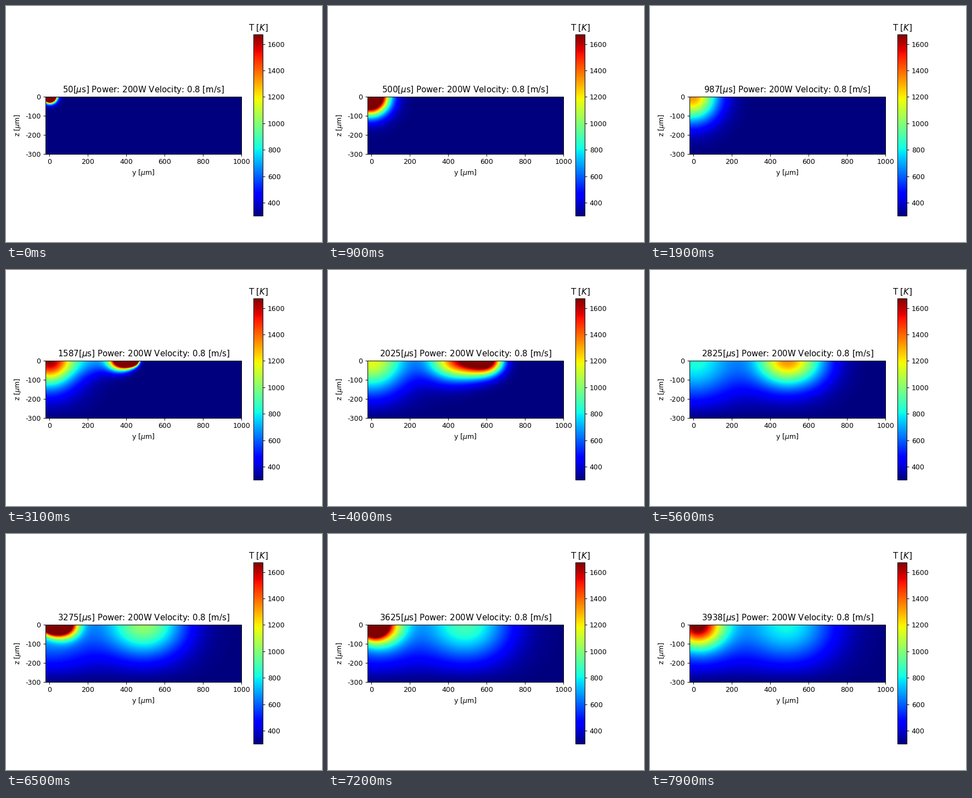
A matplotlib script that plays this animation: 576x432 px, repeating every 8000 ms.

```python
import numpy as np
import matplotlib.pyplot as plt
from matplotlib.animation import FuncAnimation

plt.rcParams["font.family"] = "DejaVu Sans"
plt.rcParams["axes.unicode_minus"] = False

FRAMES, INTERVAL = 80, 100
T_COLD, T_MELT = 300, 1673
DIFFUSION = 5      # um^2 per us
SPOT = 200         # squared beam radius, um^2
RATE = 80000       # heat put in per us at full power
LOSS = 0.1         # extra decay of old heat
DEPTH = 300        # the bottom is kept cold
PULSE = 5          # us between heat pulses

# Laser legs near the section: start, end, y from, y to, power from, power to
LEGS = [
    (0, 265, 5, -15, 1, 1),
    (987, 1097, -5, -5, 1, 1),
    (1097, 1450, 0, 338, 0.15, 0.15),
    (1450, 1830, 338, 642, 0.75, 1),
    (2150, 2300, 540, 420, 0.45, 0.45),
    (3060, 3210, 110, -10, 1, 1),
    (3400, 3480, 10, 10, 1, 1),
]

STEP = 10
y = np.arange(-20, 1001, STEP)
z = np.arange(-DEPTH, 1, STEP)


def pulses():
    """Split the legs into rows of time, place and heat."""
    rows = []
    for t0, t1, y0, y1, p0, p1 in LEGS:
        n = round((t1 - t0) / PULSE)
        u = (np.arange(n) + 0.5) / n
        rows.append([t0 + (t1 - t0) * u, y0 + (y1 - y0) * u,
                     RATE * (t1 - t0) / n * (p0 + (p1 - p0) * u)])
    return np.hstack(rows)


WHEN, WHERE, HEAT = pulses()


def field(t):
    """Temperature from all pulses so far, each spreading by diffusion."""
    past = WHEN < t
    w = SPOT + 4 * DIFFUSION * (t - WHEN[past])[:, None]
    along = np.exp(-(y - WHERE[past][:, None]) ** 2 / w)
    # a negative mirror pulse below holds the bottom cold
    down = np.exp(-z ** 2 / w) - np.exp(-(z + 2 * DEPTH) ** 2 / w)
    peak = HEAT[past][:, None] / w * (3000 / w) ** LOSS
    return T_COLD + (peak * down).T @ along


def clock(i):
    """Simulated time; a step is cut short where a scan line ends."""
    t = 50 * (i + 1)
    for first, cut in ((18, 12.5), (37, 12.5), (75, 25), (79, 12.5)):
        t -= cut * (i >= first)
    return t


def caption(t):
    shown = t - 1e-6 if t < 1900 else t
    return rf"{shown:.0f}[$\mu$s] Power: 200W Velocity: 0.8 [m/s]"


fig, ax = plt.subplots(figsize=(6.4, 4.8), dpi=90)
h = STEP / 2
image = ax.imshow(field(clock(0)), cmap="jet", vmin=T_COLD, vmax=T_MELT,
                  origin="lower", interpolation="bilinear",
                  extent=(y[0] - h, y[-1] + h, z[0] - h, z[-1] + h))
ax.set(xlim=(-20, 1000), ylim=(-DEPTH, 0),
       xticks=range(0, 1001, 200), yticks=range(-DEPTH, 1, 100),
       xlabel=r"y [$\mu$m]", ylabel=r"z [$\mu$m]")
title = ax.set_title(caption(clock(0)))
bar = fig.colorbar(image, ax=ax, ticks=range(400, 1601, 200))
bar.ax.set_title("T [$K$]")


def update(i):
    t = clock(i)
    image.set_data(field(t))
    title.set_text(caption(t))
    return image, title


anim = FuncAnimation(fig, update, frames=FRAMES, interval=INTERVAL,
                     repeat=True, repeat_delay=0, blit=False)
plt.show()
```
